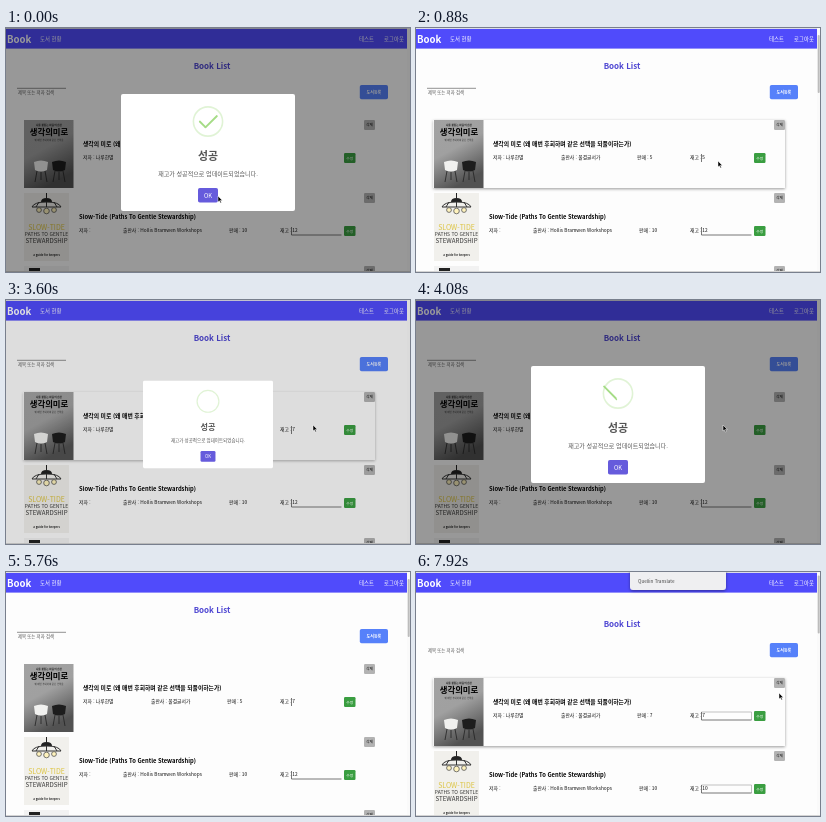
These frames come from a looping animation (404x244 px, 8000 ms). An HTML page:

```html
<!DOCTYPE html>
<html lang="ko">
<head>
<meta charset="utf-8">
<style>
  html, body { margin: 0; width: 100%; height: 100%; overflow: hidden; background: #fdfdfd; }
  svg { display: block; width: 404px; height: 244px; }
  text { font-family: "Noto Sans CJK KR", "Noto Sans CJK", "Noto Sans", sans-serif; white-space: pre; }
</style>
</head>
<body>
<svg id="stage" viewBox="0 0 404 244"></svg>
<script>
const LOOP = 8000, OPEN = 3570, CLOSE = 4900, RELOAD = 6160;
const stage = document.getElementById('stage');

const rect = (x, y, w, h, fill, more = '') =>
  `<rect x="${x}" y="${y}" width="${w}" height="${h}" fill="${fill}" ${more}/>`;
const text = (x, y, size, str, fill = '#111', more = '') =>
  `<text x="${x}" y="${y}" font-size="${size}" fill="${fill}" ${more}>${str}</text>`;
const bold = 'font-weight="700"', medium = 'font-weight="500"', mid = 'text-anchor="middle"';

const chair = (x, y, fill) => `<g transform="translate(${x} ${y})">
  <path d="M-7 -5Q0 -8 7 -5L6 3Q0 6 -6 3Z" fill="${fill}"/>
  <path d="M-4 4L-6 15M4 4L6 15M0 5V13" stroke="#222" stroke-width=".8"/></g>`;

const chairCover = `${rect(0, 0, 49.5, 68, 'url(#wall)')}
  ${text(25, 6, 2.6, '나를 붙잡는 마음의 습관', '#222', `${mid} ${bold}`)}
  ${text(25, 15.3, 8.4, '생각의미로', '#000', `${mid} ${bold}`)}
  ${text(25, 21, 2.4, '왜 매번 후회하며 같은 선택을', '#333', mid)}
  ${chair(17, 47, '#f1f1ef')}${chair(35, 47, '#1d1d1d')}`;

const lampCover = `${rect(0, 0, 45, 68, '#f1f0ec')}
  <path d="M22.5 0V5" stroke="#222"/>
  <path d="M17 9Q17 5 22.5 5Q28 5 28 9Z" fill="#222"/>
  <path d="M8 14Q10 9 22.5 9Q35 9 37 14ZM15 9L12 14M22.5 9V14M30 9L33 14" fill="none" stroke="#333"/>
  <g fill="#fff3bd" stroke="#555" stroke-width=".8">
    <circle cx="15" cy="17" r="2.4"/><circle cx="22.5" cy="18" r="2.8"/><circle cx="30" cy="17" r="2.4"/></g>
  ${text(22.5, 36.5, 7, 'SLOW-TIDE', '#dcc33f', `${mid} ${medium}`)}
  ${text(22.5, 43, 5, 'PATHS TO GENTLE', '#333', mid)}
  ${text(22.5, 50, 6.2, 'STEWARDSHIP', '#333', mid)}
  ${text(22.5, 63, 2.8, 'a guide for keepers', '#222', `${mid} ${bold}`)}`;

const row = (y, cover, x, title, author, publisher, px, sx) => `<g transform="translate(0 ${y})">
  <g transform="translate(18 0)">${cover}</g>
  ${text(x, 26, 5.8, title, '#000', bold)}
  ${text(x, 39, 4.8, '저자 : ' + author, '#111', medium)}
  ${text(px, 39, 4.8, '출판사 : ' + publisher, '#111', medium)}
  ${text(sx, 39, 4.8, '', '#111', medium + ' class="sales"')}
  ${text(274, 39, 4.8, '재고 :', '#111', medium)}
  <path class="box" d="M335.5 42V34H285.5" fill="none" stroke="#999" stroke-width=".6"/>
  <path d="M285.5 34V42" stroke="#555" stroke-width=".8"/>
  <path class="line" d="M285.5 42H335.5" stroke="#555" stroke-width=".8"/>
  ${text(286.3, 39.4, 4.8, '', '#111', medium + ' class="stock"')}
  ${rect(338, 33, 11.5, 10, '#3a9e41', 'rx="1.2"')}${text(343.7, 39.5, 3.8, '수정', '#fff', mid)}
  ${rect(358, 0, 11, 10, '#b3b3b3', 'rx="1.2"')}${text(363.5, 6.4, 3.8, '삭제', '#111', mid)}
</g>`;

stage.innerHTML = `
<defs>
  <linearGradient id="wall" x1="0" y1="0" x2=".4" y2="1">
    <stop offset="0" stop-color="#a2a2a2"/><stop offset=".5" stop-color="#a0a0a0"/><stop offset="1" stop-color="#525252"/>
  </linearGradient>
  <filter id="shadow" x="-10%" y="-20%" width="120%" height="150%">
    <feDropShadow dx="0" dy="1" stdDeviation="1.6" flood-opacity=".4"/>
  </filter>
</defs>
${rect(0, 0, 404, 244, '#fdfdfd')}
<g id="page">
  ${text(206, 41, 8, 'Book List', '#4d45d2', `${mid} ${bold}`)}
  <path id="searchBox" d="M11 60.3H60" stroke="#777" stroke-width=".8"/>
  ${text(12, 66, 4.4, '제목 또는 저자 검색', '#555')}
  ${rect(353.8, 57, 28.2, 14.3, '#5681fa', 'rx="1.8"')}
  ${text(367.9, 65.8, 4, '도서등록', '#fff', `${mid} ${bold}`)}
  <g id="hover">${rect(17.5, 92, 351.5, 68, '#fdfdfd', 'filter="url(#shadow)"')}</g>
  ${row(92, chairCover, 77, '생각의 미로 (왜 매번 후회하며 같은 선택을 되풀이하는가)', '나루한별', '물결글서가', 145, 221)}
  ${row(165, lampCover, 73, 'Slow-Tide (Paths To Gentle Stewardship)', '', 'Hollis Bramwen Workshops', 117, 223)}
  ${rect(358, 238, 11, 10, '#b3b3b3', 'rx="1.2"')}${text(363.5, 244.4, 3.8, '삭제', '#111', mid)}
  ${rect(18, 238, 45, 68, '#f2f2f2')}${rect(23, 240, 11, 6, '#222')}
  <path id="caret" d="M290 127V133" stroke="#111" stroke-width=".7"/>
  <g id="spinner">${rect(330, 126.5, 4.5, 6.5, '#e2e2e2')}
    <path d="M331 129L332.2 127.4L333.4 129ZM331 130.6L332.2 132.2L333.4 130.6Z" fill="#555"/></g>
</g>
${rect(0, 0, 401, 1, '#dcdcea')}
${rect(0, 1, 401, 19.6, '#504bfb')}
${text(1, 15, 9.6, 'Book', '#fff', bold)}
${text(34, 13, 5.4, '도서 현황', '#fff', medium)}
${text(353, 13, 5.4, '테스트', '#fff', medium)}
${text(378, 13, 5.4, '로그아웃', '#fff', medium)}
${rect(401, 0, 3, 244, '#fafafa')}
${rect(401.7, 7, 2, 58, '#bcbcbc', 'rx="1" id="thumb"')}
${rect(0, 243, 404, 1, '#d4d4d4')}
<g id="popup">
  ${rect(214, -6, 96, 24, '#efeff1', 'rx="3" filter="url(#shadow)"')}
  ${text(222, 11, 4.6, 'Quellin Translate', '#444')}
</g>
${rect(0, 0, 404, 244, '#000', 'id="dim"')}
<g id="modal">
  ${rect(115, 66, 174, 117, '#fff', 'rx="2"')}
  <circle cx="202" cy="93.5" r="14.6" fill="none" stroke="#a5dc86" stroke-opacity=".35" stroke-width="1.6"/>
  ${rect(0, 0, 0, 1.9, '#a5dc86', 'rx=".7" id="tip"')}${rect(0, 0, 0, 1.9, '#a5dc86', 'rx=".7" id="long"')}
  ${text(202, 132, 10.9, '성공', '#545454', `${mid} ${bold}`)}
  ${text(202, 148, 6.05, '재고가 성공적으로 업데이트되었습니다.', '#545454', mid)}
  ${rect(192, 160, 20, 14.5, '#665bdc', 'rx="1.8"')}${text(202, 169.6, 5.8, 'OK', '#fff', mid)}
</g>
<g id="cursor">
  <path id="arrow" d="M0 0V6L1.4 4.8L2.4 7L3.4 6.5L2.4 4.4H4.3Z" fill="#000" stroke="#fff" stroke-width=".5"/>
  <path id="beam" d="M-1 -2.8H1M0 -2.8V2.8M-1 2.8H1" stroke="#222" stroke-width=".6"/>
</g>`;

const el = Object.fromEntries([...stage.querySelectorAll('[id]')].map(n => [n.id, n]));
const [stockA, stockB] = stage.querySelectorAll('.stock');
const [salesA, salesB] = stage.querySelectorAll('.sales');
const boxes = stage.querySelectorAll('.box');
const firstLine = stage.querySelector('.line');

const clamp = v => Math.max(0, Math.min(1, v));
const smooth = v => v * v * (3 - 2 * v);
// Eased value between keys of the form [time, ...values]
function track(keys, t) {
  const i = keys.findIndex(k => k[0] > t);
  if (i < 0) return keys.at(-1).slice(1);
  if (i === 0) return keys[0].slice(1);
  const a = keys[i - 1], b = keys[i], p = smooth((t - a[0]) / (b[0] - a[0]));
  return a.slice(1).map((v, j) => v + (b[j + 1] - v) * p);
}

const mouse = [[160, 212, 168], [880, 302, 133], [1360, 299, 130], [1680, 299, 130], [1760, 296, 131],
  [2240, 296, 131], [2560, 296.5, 134.5], [3360, 307, 125], [4450, 307, 125], [4800, 203, 167], [4960, 203, 167],
  [5280, 70, -12], [RELOAD, 70, -12], [6400, 91, 38], [6880, 128, 62], [7040, 128, 62], [7840, 363, 121]];
const hoverKeys = [[450, 0], [650, 1], [OPEN, 1], [OPEN + 100, 0], [7300, 0], [7500, 1]];
const scrollKeys = [[7100, 16], [7350, 14]];
const popKeys = [[0, .7], [135, 1.05], [240, .95], [300, 1]];
// Check strokes: [progress, centre x, top, length] in em of the icon
const tipKeys = [[.54, .125, 1.0625, 0], [.7, 1.1875, 2.1875, 3.125], [.84, 1.84375, 3, 1.0625], [1, 1.59375, 2.8125, 1.5625]];
const longKeys = [[.65, 2.125, 3.375, 0], [.84, 3.28125, 2.1875, 3.4375], [1, 3.03125, 2.375, 2.9375]];

const show = (node, on) => node.setAttribute('opacity', +on);
const label = (node, str) => { if (node.textContent !== str) node.textContent = str; };

function stroke(node, keys, p, angle) {
  const [cx, top, w] = track(keys, p), x = 187 + cx * 6, y = 78.5 + top * 6;
  node.setAttribute('width', w * 6);
  node.setAttribute('x', x - w * 3);
  node.setAttribute('y', y);
  node.setAttribute('transform', `rotate(${angle} ${x} ${y + .95})`);
}

function drawModal(t) {
  const opening = t >= OPEN;
  const shut = clamp((t - (opening ? CLOSE : 100)) / 150);
  const on = t < 250 || (opening && t < CLOSE + 150);
  const age = opening ? t - OPEN : 1000;
  const scale = track(popKeys, age)[0] * (1 - shut / 2);
  show(el.dim, on ? .4 * clamp(age / 100) * (1 - shut) : 0);
  show(el.modal, on ? 1 - shut : 0);
  el.modal.setAttribute('transform', `translate(202 124.5) scale(${scale}) translate(-202 -124.5)`);
  stroke(el.tip, tipKeys, age / 750, 45);
  stroke(el.long, longKeys, age / 750, -45);
  show(el.thumb, !on);
}

function draw(t) {
  const fresh = t >= RELOAD;
  const scroll = fresh ? track(scrollKeys, t)[0] : 0;
  el.page.setAttribute('transform', `translate(0 ${scroll})`);
  el.thumb.setAttribute('y', 7 - scroll / 4);
  show(el.hover, track(hoverKeys, t)[0]);
  show(el.popup, fresh);
  show(el.searchBox, !fresh);
  show(firstLine, fresh);
  boxes.forEach(b => show(b, t >= 7040));

  label(stockA, t < 2240 ? '5' : t < 3440 ? '4' : '7');
  label(stockB, fresh ? '10' : '12');
  label(salesA, '판매 : ' + (fresh ? 7 : 5));
  label(salesB, '판매 : 10');
  const editing = t >= 1680 && t < OPEN;
  show(el.caret, editing && (t - 1680) % 1000 < 500);
  show(el.spinner, t >= 2240 && t < OPEN);

  const [x, y] = track(mouse, t), beam = t >= 960 && t < OPEN;
  el.cursor.setAttribute('transform', `translate(${x} ${y})`);
  show(el.beam, beam);
  show(el.arrow, !beam);
  drawModal(t);
}

const start = performance.now();
function tick() {
  draw((performance.now() - start) % LOOP);
  requestAnimationFrame(tick);
}
tick();
</script>
</body>
</html>
```
